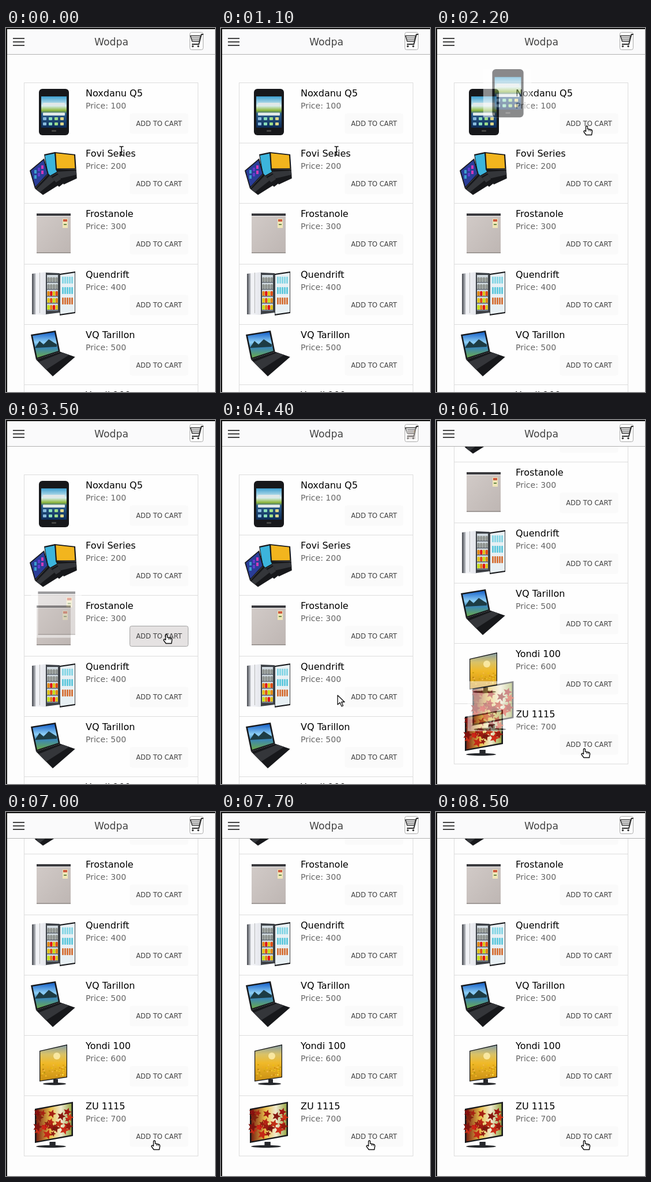
An HTML page for the animation above (8600 ms loop, 362 px wide and 628 px high).

```html
<!DOCTYPE html>
<html lang="en">
<head>
<meta charset="utf-8">
<title>Shop list</title>
<style>
  html, body { margin: 0; width: 100%; height: 100%; overflow: hidden; background: #fdfdfd; }
  svg { display: block; width: 362px; height: 628px; font-family: "DejaVu Sans", sans-serif; }
  .name { font-size: 16px; fill: #000; }
  .price { font-size: 14px; fill: #666; }
  .label { font-size: 11.6px; fill: #444; text-anchor: middle; }
  .btn { fill: #fafafa; }
  .btn.on { fill: #e5e2e2; stroke: #a2a2a2; }
</style>
</head>
<body>
<svg viewBox="0 0 362 628">
  <defs>
    <linearGradient id="steel" x2="1" y2="1"><stop stop-color="#d2cbc8"/><stop offset="1" stop-color="#beb6b3"/></linearGradient>
    <linearGradient id="door"><stop stop-color="#44474d"/><stop offset=".2" stop-color="#a9acb2"/><stop offset=".3" stop-color="#f4f5f8"/><stop offset="1" stop-color="#e2e4ea"/></linearGradient>
    <linearGradient id="meadow" x2="0" y2="1"><stop stop-color="#3fa0d0"/><stop offset=".3" stop-color="#d8eef0"/><stop offset=".45" stop-color="#8fb83c"/><stop offset=".55" stop-color="#2d5f8c"/><stop offset="1" stop-color="#0d2c58"/></linearGradient>
    <linearGradient id="lake" x2="0" y2="1"><stop stop-color="#1560c8"/><stop offset=".4" stop-color="#8fd0f6"/><stop offset=".6" stop-color="#3a86b8"/><stop offset="1" stop-color="#6aa84a"/></linearGradient>
    <linearGradient id="dusk" x2="0" y2="1"><stop stop-color="#8aa0a4"/><stop offset=".25" stop-color="#d9c268"/><stop offset=".5" stop-color="#f0b928"/><stop offset="1" stop-color="#c98f14"/></linearGradient>
    <linearGradient id="autumn"><stop stop-color="#7a2010"/><stop offset=".4" stop-color="#e8c04a"/><stop offset=".7" stop-color="#f0ead0"/><stop offset="1" stop-color="#9aa848"/></linearGradient>
    <g id="pics"></g>
  </defs>
  <rect width="362" height="628" fill="#fdfdfd"/>
  <g id="list"></g>
  <rect id="bar" x="356" width="3" rx="1.5" fill="#b0b0b0"/>
  <g id="head">
    <rect width="362" height="45" fill="#fafafb"/>
    <path d="M0 45.5H362" stroke="#b2b2b2"/>
    <path d="M12 18H32M12 24H32M12 30H32" stroke="#444" stroke-width="2"/>
    <text x="182.5" y="30" font-size="17.2" fill="#444" text-anchor="middle">Wodpa</text>
    <rect x="318.5" y="7.5" width="23" height="30" rx="3" fill="#fdfdfd" stroke="#aaa"/>
    <g fill="none" stroke="#333">
      <path d="M342 11H338.500L334 28H322" stroke-width="2"/>
      <path d="M319.500 13.500H337L335 23H322.500Z" stroke-width="1.500"/>
      <path d="M320.500 17H336M321.500 20H335.500"/>
      <circle cx="323.500" cy="31.500" r="1.300" fill="#333"/><circle cx="333" cy="31.500" r="1.300" fill="#333"/>
    </g>
  </g>
  <g id="ghost" opacity=".5"><rect x="42" y="11" width="80" height="80" fill="#fff"/><use id="copy"/></g>
  <path d="M0 1H362M1 0V628" stroke="#111" stroke-width="2"/>
  <g id="cursor" stroke-linejoin="round">
    <path id="arrow" d="M0 0V16L4 12.500L7 19L9.500 18L6.700 11.500H12Z" fill="#fff" stroke="#111" stroke-width="1.300"/>
    <path id="beam" d="M-3.500-7.500H-1L0-6.500L1-7.500H3.500M0-6.500V6.500M-3.500 7.500H-1L0 6.500L1 7.500H3.500" fill="none" stroke="#111" stroke-width="1.600"/>
    <g id="hand">
      <path d="M-1.500 2Q0 0 1.500 2V6L8 7.500Q10 8.500 9.500 11L8.500 16.500H-1L-5 11Q-5 8.500-2.500 9.500L-1.500 10.500Z" fill="#fff" stroke="#111" stroke-width="1.400"/>
      <path d="M4 7V10M6.800 8V10.500" stroke="#111"/>
    </g>
  </g>
</svg>
<script>
const LOOP = 8600, TRAVEL = 400, END = 230, DARK = '#17181b';
const $ = id => document.getElementById(id);
const names = ['Noxdanu Q5', 'Fovi Series', 'Frostanole', 'Quendrift', 'VQ Tarillon', 'Yondi 100', 'ZU 1115'];
const rowTop = i => Math.round(94 + i * 104.2);

const box = (x, y, w, h, fill, rx = 0) => `<rect x="${x}" y="${y}" width="${w}" height="${h}" rx="${rx}" fill="${fill}"/>`;
const poly = (pts, fill) => `<polygon points="${pts.map(p => p.map(v => v.toFixed(1))).join(' ')}" fill="${fill}"/>`;
const times = (n, f) => Array.from({ length: n }, (_, i) => f(i)).join('');
const grid = (cols, rows, f) => times(cols * rows, i => f(i % cols, i / cols | 0));
const add = (a, b, k = 1) => [a[0] + b[0] * k, a[1] + b[1] * k];
let seed = 7;
const rnd = () => (seed = seed * 16807 % 2147483647) / 2147483647;

// Panel with upright sides whose right edge is raised.
const slab = (x, y, w, h, rise, taper = 0) => [[x, y], [x + w, y - rise], [x + w, y - rise + h + taper], [x, y + h]];

// Dark frame around a picture, shrunk towards the middle.
function screen(pts, fill, k = .92) {
  const mid = pts.reduce((m, p) => add(m, p, .25), [0, 0]);
  return poly(pts, DARK) + poly(pts.map(p => [0, 1].map(i => mid[i] + (p[i] - mid[i]) * k)), fill);
}

// Lid from a corner, its top and side edges; base from the depth at each end.
function laptop(o, top, side, far, near, fill) {
  const tr = add(o, top), a = add(o, side), b = add(tr, side, .85);
  const base = [a, b, add(b, far), add(a, near)];
  return screen([o, tr, b, a], fill, .88) + poly(base, DARK) +
    poly([add(a, near, .15), add(b, far, .15), add(b, far, .6), add(a, near, .6)], '#34363a');
}

const stand = (x, y, w) => box(x + w * .45, y - 8, w * .2, 8, '#26282c') +
  `<ellipse cx="${x + w / 2}" cy="${y}" rx="${w / 2}" ry="2.2" fill="#26282c"/>`;

function leaf() {
  const x = 54 + rnd() * 57, y = 29 + rnd() * 42 - (x - 54) * .17, r = 5 + rnd() * 4;
  const pts = Array.from({ length: 10 }, (_, k) =>
    add([x, y], [Math.cos(k * Math.PI / 5), Math.sin(k * Math.PI / 5)], k % 2 ? r * .45 : r));
  return poly(pts, `hsl(${rnd() * 10} 80% ${25 + rnd() * 20}%)`);
}

const pics = [
  box(57, 11, 52, 80, DARK, 6) + box(61, 24, 44, 54, 'url(#meadow)') + box(79, 82, 8, 3, '#444', 1) +
    times(2, i => box(64, 35 + i * 17, 38, 5, '#e0e8e8', 1)) +
    grid(4, 2, (c, r) => box(64 + c * 10, 60 + r * 9, 6, 5, `hsl(${205 - c * 50} 55% 70%)`, 1)),

  laptop([66, 20], [19, -4], [7, 41], [14, 15], [19, 15], '#3cb4dc') +
    laptop([84, 16], [36, 4], [2, 30], [1, 16], [14, 26], '#f2b51e') +
    laptop([41, 48], [25, -21], [9, 31], [17, 20], [14, 11], '#2a3d98') +
    grid(3, 2, (c, r) => box(49 + c * 6, 47 + r * 9 - c * 4, 4, 6, `hsl(${200 + c * 55} 60% 52%)`)),

  box(53, 18, 59, 68, 'url(#steel)') + box(53, 18, 59, 4, '#3a3a3e') + box(53, 22, 59, 1, '#eee') +
    box(98, 27, 9, 16, '#efe6b8') + box(99, 28, 7, 4, '#cf5a40') + box(100, 36, 5, 2, '#6a8a4a') + box(53, 85, 59, 1.5, '#8a8380'),

  poly(slab(45, 17, 25, 70, 3, 4), 'url(#door)') + box(58, 15, .8, 70, '#aaa') +
    poly(slab(69, 15, 24, 72, -1, -4), '#3c4046') + box(71, 19, 19, 62, '#cfd8de') +
    grid(4, 5, (c, r) => box(71.5 + c * 4.7, 23 + r * 12, 4.2, 8, r < 2 ? '#8f9490' : `hsl(${(c * 3 + r) % 5 * 17} 85% 48%)`, 1.5)) +
    times(5, i => box(71, 31 + i * 12, 19, 1.5, '#59616a')) +
    screen(slab(93, 17, 27, 72, 4), '#e8f0f4', .94) +
    grid(5, 3, (c, r) => box(97 + c * 4, 22 + r * 18, 3, 12, `hsl(${r < 2 ? 190 : 22} 65% ${72 - r * 9}%)`, 1)),

  laptop([43, 18], [43, -7], [9, 43], [26, 9], [29, 29], 'url(#lake)') +
    poly([[50, 41], [58, 29], [65, 35], [74, 26], [88, 35], [88, 39]], '#1d3c44'),

  screen(slab(58, 27, 48, 53, 11, 4), 'url(#dusk)', .95) + '<circle cx="88" cy="36" r="6" fill="#fff0b0" opacity=".8"/>' +
    times(40, () => box(60 + rnd() * 42, 50 + rnd() * 20, 2.5, 2, `hsl(${38 + rnd() * 14} 90% ${35 + rnd() * 30}%)`)) +
    stand(64, 84, 40),

  stand(52, 88, 52) + screen(slab(50, 23, 66, 59, 12), 'url(#autumn)') + times(24, leaf)
];

$('pics').innerHTML = pics.map((p, i) => `<g id="p${i}">${p}</g>`).join('');
$('list').innerHTML = names.map((name, i) => `
  <g transform="translate(0 ${rowTop(i)})">
    <rect x="31.5" y=".5" width="301" height="${rowTop(i + 1) - rowTop(i)}" fill="#fefefe" stroke="#ddd"/>
    <use href="#p${i}"/>
    <text class="name" x="138" y="24">${name}</text>
    <text class="price" x="138" y="45">Price: ${i + 1}00</text>
    <rect class="btn" x="214.5" y="53.5" width="101" height="35" rx="3"/>
    <text class="label" x="265" y="75">ADD TO CART</text>
  </g>`).join('');
const buttons = [...document.querySelectorAll('.btn')];

// Pointer stops: arrival time, place and, where it clicks, the row.
const stops = [[0, 200, 212], [1700, 261, 168, 0], [3150, 278, 369, 2], [4300, 202, 475], [4800, 262, 303], [5670, 257, 566, 6]];
const clicks = stops.filter(s => s.length > 3).map(([at, , , row]) => ({ at: at + 80, row }));

const clamp = v => Math.min(1, Math.max(0, v));
const smooth = v => (v = clamp(v), v * v * (3 - 2 * v));
const expo = u => u <= 0 ? 0 : u >= 1 ? 1 : u < .5 ? 2 ** (20 * u - 10) / 2 : 1 - 2 ** (10 - 20 * u) / 2;
const scrollAt = t => 239 * smooth((t - 4750) / 400) - (239 - END) * smooth((t - 5250) / 350);

const pointerAt = t => stops.reduce(([x, y], [at, nx, ny]) => {
  const u = smooth((t - at + TRAVEL) / TRAVEL);
  return [x + (nx - x) * u, y + (ny - y) * u];
}, [0, 0]);

function drawCursor([x, y], scroll) {
  const local = (y + scroll - 94) % 104.2;
  const kind = x > 214 && x < 316 && local > 53 && local < 89 ? 'hand'
    : x > 138 && x < 225 && local > 9 && local < 48 ? 'beam' : 'arrow';
  for (const id of ['hand', 'beam', 'arrow']) $(id).style.display = id === kind ? '' : 'none';
  $('cursor').setAttribute('transform', `translate(${x} ${y})`);
}

function drawGhost(t, scroll) {
  const hit = clicks.find(c => t >= c.at && t < c.at + 1250);
  $('ghost').style.display = hit ? '' : 'none';
  if (!hit) return;
  const age = t - hit.at, p = expo(age / 1000), y = rowTop(hit.row) - scroll + 36.5;
  const size = (1.1 - .35 * p) * (1 - clamp((age - 1000) / 250));
  $('copy').setAttribute('href', '#p' + hit.row);
  $('ghost').setAttribute('transform',
    `translate(${82 + 248 * p} ${y + (24 - y) * p}) scale(${size}) translate(-82 -51)`);
}

function drawBar(t, scroll) {
  const top = 44 + Math.min(scroll, END) * .7174 + Math.max(0, scroll - END) * 1.4;
  $('bar').setAttribute('y', top);
  $('bar').setAttribute('height', Math.min(419, 628 - top));
  $('bar').style.opacity = t < 4750 ? 0 : 1 - clamp((t - 5600) / 250);
}

function render(now) {
  const t = now % LOOP, scroll = scrollAt(t);
  $('list').setAttribute('transform', `translate(0 ${-Math.round(scroll)})`);
  buttons.forEach((b, i) =>
    b.classList.toggle('on', clicks.some(c => c.row === i && t > c.at - 80 && t < c.at + 320)));
  drawBar(t, scroll);
  drawGhost(t, scroll);
  drawCursor(pointerAt(t), scroll);
}

const began = performance.now();
function tick() {
  render(performance.now() - began);
  requestAnimationFrame(tick);
}
tick();
</script>
</body>
</html>
```
